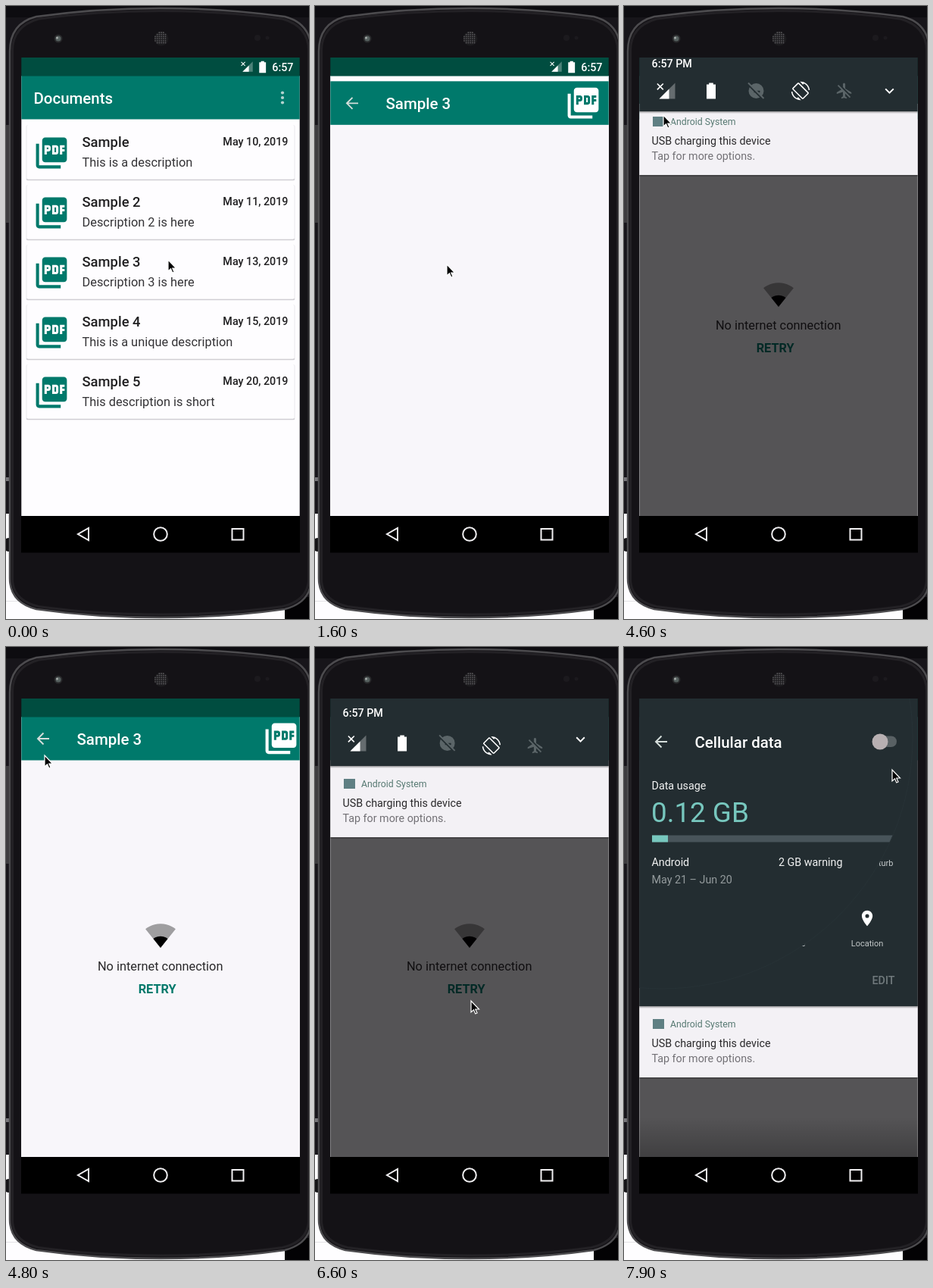
Animation, 400 px wide and 809 px high, one loop 8000 ms. Source, as an HTML page:

```html
<!DOCTYPE html>
<html lang="en">
<head>
<meta charset="utf-8">
<title>Document viewer demo</title>
<style>
html, body { margin: 0; width: 100%; height: 100%; overflow: hidden; background: #17151a; }
svg { display: block; width: 100%; height: 100%; font-family: Roboto, sans-serif; }
</style>
</head>
<body>
<svg id="stage" viewBox="0 0 400 809" xmlns="http://www.w3.org/2000/svg"></svg>
<script>
const LOOP = 8000, STEP = 100;
const TEAL = '#00796b', PANEL = '#232d31', DIM = '#5b6568';

const text = (x, y, s, size, fill, extra = '') =>
  `<text x="${x}" y="${y}" font-size="${size}" fill="${fill}" ${extra}>${s}</text>`;
const MEDIUM = 'font-weight="500"';
const rect = (x, y, w, h, fill, extra = '') =>
  `<rect x="${x}" y="${y}" width="${w}" height="${h}" fill="${fill}" ${extra}/>`;
const group = (id, body, extra = '') => `<g id="${id}" ${extra}>${body}</g>`;

const PDF = 'M20 2H8c-1.1 0-2 .9-2 2v12c0 1.1.9 2 2 2h12c1.1 0 2-.9 2-2V4c0-1.1-.9-2-2-2z' +
  'm-8.5 7.5c0 .83-.67 1.5-1.5 1.5H9v2H7.5V7H10c.83 0 1.5.67 1.5 1.5v1zm5 2c0 .83-.67 1.5-1.5 1.5h-2.5V7H15' +
  'c.83 0 1.5.67 1.5 1.5v3zm4-3H19v1h1.5V11H19v2h-1.5V7h3v1.5zM9 9.5h1v-1H9v1zM4 6H2v14c0 1.1.9 2 2 2h14v-2H4V6z' +
  'm10 5.5h1v-3h-1v3z';
const pdfIcon = (x, y, fill) => `<path d="${PDF}" fill="${fill}" transform="translate(${x} ${y}) scale(2.04)"/>`;
const FAN = 'M12 21.5L23.64 7C23.2 6.66 18.7 3 12 3S.8 6.66.36 7z';

const signal = size => {
  const h = size / 2, k = size * .62;
  return `<path d="M${-h} ${h}H${h}V${-h}z" fill="#fff" opacity=".3"/>
    <path d="M${-h} ${h}h${k}v${-k}z" fill="#fff"/>
    <path d="M${-h * 1.25} ${-h * .9}l${h * .75} ${h * .75}m0 ${-h * .75}l${-h * .75} ${h * .75}" stroke="#fff" stroke-width="${size / 13}"/>`;
};
const battery = s => `<path transform="scale(${s})" fill="#fff" d="M-6-8.5h3.2V-10.5h5.6v2H6V10.5H-6z"/>`;
const icon24 = (d, fill) => `<path transform="translate(-12.2 -12.2) scale(1.02)" fill="${fill}" d="${d}"/>`;
const arrow = y => `<path d="M57 ${y}H41.5m8-7.5l-7.5 7.5l7.5 7.5" fill="none" stroke="#d5dedb" stroke-width="1.9"/>`;

const ROTATE = 'M16.48 2.52c3.27 1.55 5.61 4.72 5.97 8.48h1.5C23.44 4.84 18.29 0 12 0l-.66.03 3.81 3.81 1.33-1.32z' +
  'm-6.25-.77c-.59-.59-1.54-.59-2.12 0L1.75 8.11c-.59.59-.59 1.54 0 2.12l12.02 12.02c.59.59 1.54.59 2.12 0l6.36-6.36' +
  'c.59-.59.59-1.54 0-2.12L10.23 1.75zm4.6 19.44L2.81 9.17l6.36-6.36 12.02 12.02-6.36 6.36zm-7.31.29' +
  'C4.25 19.94 1.91 16.76 1.55 13H.05C.56 19.16 5.71 24 12 24l.66-.03-3.81-3.81-1.33 1.32z';
const PLANE = 'M13 9V3.5c0-.83-.67-1.5-1.5-1.5S10 2.67 10 3.5v3.68l7.83 7.83L21 16v-2l-8-5zM3 5.27l4.99 4.99L2 14v2' +
  'l8-2.5V19l-2 1.5V22l3.5-1 3.5 1v-1.5L13 19v-3.73L18.73 21 20 19.73 4.27 4 3 5.27z';
const PIN = 'M12 2C8.13 2 5 5.13 5 9c0 5.25 7 13 7 13s7-7.75 7-13c0-3.87-3.13-7-7-7zm0 9.5a2.5 2.5 0 110-5 2.5 2.5 0 010 5z';
const DISTURB = `<circle r="10" fill="${DIM}"/><path d="M-3 1h8M-11-9L9 11" stroke="${PANEL}" stroke-width="2.5"/>
  <path d="M-10.5-10.5L10 10" stroke="${DIM}" stroke-width="2"/>`;

// Quick setting: drawing, collapsed x, expanded position, label.
const tiles = [
  [signal(21), 57, 87, 252, 'Android'],
  [battery(1), 115, 204, 252, '100%'],
  [DISTURB, 174.5, 321, 252, 'Do not disturb'],
  [icon24(ROTATE, '#fff'), 233, 87, 358, 'Auto-rotate'],
  [icon24(PLANE, DIM), 291, 204, 358, 'Airplane mode'],
];

const documents = [
  ['Sample', 'This is a description', 10],
  ['Sample 2', 'Description 2 is here', 11],
  ['Sample 3', 'Description 3 is here', 13],
  ['Sample 4', 'This is a unique description', 15],
  ['Sample 5', 'This description is short', 20],
];

function phone() {
  let dots = '';
  for (let y = -8; y <= 8; y += 2.7)
    for (let x = -8; x <= 8; x += 2.7)
      if (x * x + y * y < 75) dots += `<circle cx="${205 + x}" cy="${43 + y}" r=".9"/>`;
  return rect(0, 0, 400, 809, '#17151a') + rect(0, 0, 400, 15, '#0d0c10') +
    rect(0, 670, 368, 139, '#fefdff') + rect(0, 785, 368, 1, '#e4e3e6') + rect(368, 780, 32, 29, '#030204') +
    '<circle cx="4" cy="711" r="9" fill="#151417"/>' +
    rect(0, 157, 5, 129, '#3d3c3f') + rect(0, 622, 5, 5, '#77767a') +
    `<path d="M5 60Q5 23 40 14Q120 3 204 3T368 14Q403 23 403 60V755Q403 787 368 796Q290 807 204 807T40 796Q5 787 5 755z"
      fill="#141216" stroke="#4c4b4e" stroke-width="2.5"/>
    <path d="M8.5 60Q8 27 43 17Q120 6.5 204 6.5T365 17Q400 27 399.5 60V755Q400 784 365 792.5Q290 803 204 803T43 792.5Q8 784 8.5 755z"
      fill="none" stroke="#232125" stroke-width="3"/>
    <circle cx="69" cy="43" r="5.5" fill="#29292b"/><circle cx="69" cy="43" r="3.5" fill="#56605f"/><circle cx="67.5" cy="42" r="1.5" fill="#a5aaa9"/>
    <circle cx="205" cy="43" r="9.5" fill="#1c1b1e"/><g fill="#58575a">${dots}</g>
    <circle cx="332" cy="42" r="4" fill="#1c1a1e"/><circle cx="345" cy="42" r="2.5" fill="#1c1a1e"/>`;
}

function listScreen() {
  const card = ([name, about, day], i) => `<g transform="translate(0 ${i * 79})">
    ${rect(26.5, 157, 355, 73.5, '#e9e8eb', 'rx="2.5"')}${rect(27, 228, 354, 2, '#d0ced3', 'rx="1"')}
    ${rect(27.5, 157, 353, 71.8, '#fefdff', 'rx="2"')}${pdfIcon(35.5, 169.5, TEAL)}
    ${text(100.5, 185.5, name, 18.4, '#212022', MEDIUM)}${text(100.5, 212, about, 16.35, '#343336')}
    ${text(372.5, 184, `May ${day}, 2019`, 14.3, '#212022', MEDIUM + ' text-anchor="end"')}</g>`;
  return rect(20, 92, 368, 581, '#fefdff') + rect(20, 92, 368, 57.5, TEAL) +
    text(36.5, 129, 'Documents', 20.44, '#fff', MEDIUM) +
    [114.5, 121, 127.5].map(y => `<circle cx="365" cy="${y}" r="2.1" fill="#b4d3cf"/>`).join('') +
    documents.map(card).join('');
}

function viewerScreen() {
  const fan = 'transform="translate(183.5 360.2) scale(1.71)"';
  const message = `<path d="${FAN}" ${fan} opacity=".36"/><path id="bars" d="${FAN}"/>` +
    text(203.7, 427, 'No internet connection', 16.35, '#2a292b', 'text-anchor="middle"') +
    text(199.7, 457, 'RETRY', 16.35, TEAL, 'font-weight="700" text-anchor="middle"');
  return rect(20, 92, 368, 581, '#fefdff') + group('slide',
    rect(20, 92, 368, 581, '#f8f6fa') + rect(20, 92, 368, 57.5, TEAL) + arrow(121) +
    text(93.5, 129, 'Sample 3', 20.44, '#fff', MEDIUM) + group('action', pdfIcon(338.5, 96.3, '#fff')) +
    group('message', message));
}

function shade() {
  const notice = rect(20, 150, 368, 94, '#f3f1f5') + rect(20, 244, 368, 2, '#000', 'opacity=".2"') +
    rect(38, 167, 15, 13, '#5f7f83') + text(61, 178, 'Android System', 12.3, '#587a73') +
    text(36.5, 204, 'USB charging this device', 14.3, '#2a292b') +
    text(36.5, 224, 'Tap for more options.', 14.3, '#737176');
  const label = (x, y, s) => text(x, y, s, 11, '#c3c8c9', 'text-anchor="middle"');
  const labels = tiles.map(([, , x, y, s]) => label(x, y + 37, s)).join('') + label(321, 395, 'Location') +
    `<g transform="translate(321 358)">${icon24(PIN, '#fff')}</g>` + text(327.5, 445, 'EDIT', 14.3, '#717a7d', MEDIUM);
  const detail = rect(20, 68, 368, 406, PANEL) + arrow(125) +
    text(93.5, 133, 'Cellular data', 20.44, '#fff', MEDIUM) +
    rect(333, 117.5, 27, 14.5, '#596164', 'rx="7.25"') + '<circle cx="338" cy="125" r="10.5" fill="#b8b0b2"/>' +
    text(36.5, 187.5, 'Data usage', 14.3, '#f2f3f3') + text(36, 231, '0.12 GB', 36.8, '#77c7be') +
    rect(37, 248.5, 334, 9, '#48545a') + rect(37, 248.5, 21, 9, '#77c7be') +
    text(36.5, 289, 'Android', 14.3, '#f2f3f3') + text(204, 289, '2 GB warning', 14.3, '#f2f3f3') +
    text(36.5, 312, 'May 21 – Jun 20', 14.3, '#949b9d');
  return rect(20, 620, 368, 53, 'url(#fade)', 'id="footFade"') + group('notice', notice) + group('header',
    rect(20, 150, 368, 3, 'url(#shadow)', 'id="panelShadow"') +
    rect(20, 0, 368, 150, PANEL, 'id="panel"') + text(36.5, 92.3, '6:57 PM', 14.3, '#fff', MEDIUM) +
    tiles.map(([art], i) => group('tile' + i, art)).join('') +
    group('chevron', '<path d="M-5.3-2.6L0 2.7L5.3-2.6" fill="none" stroke="#fff" stroke-width="2"/>') +
    group('labels', labels) + group('detail', detail, 'clip-path="url(#reveal)"') +
    '<circle id="ring" cx="50" cy="120" fill="none" stroke="#273236" clip-path="url(#panelClip)"/>');
}

const vertical = (id, from, to) => `<linearGradient id="${id}" x2="0" y2="1">
  <stop stop-opacity="${from}"/><stop offset="1" stop-opacity="${to}"/></linearGradient>`;

const stage = document.getElementById('stage');
stage.innerHTML = `<defs>${vertical('shadow', .4, 0)}${vertical('fade', 0, .25)}
    <clipPath id="screen"><rect x="20.3" y="68" width="367.4" height="605"/></clipPath>
    <clipPath id="panelClip"><rect id="panelBox" x="20" y="68" width="368" height="82"/></clipPath>
    <clipPath id="reveal" clip-path="url(#panelClip)"><circle id="hole" cx="50" cy="120"/></clipPath>
  </defs>${phone()}
  <g clip-path="url(#screen)">${group('list', listScreen())}${group('viewer', viewerScreen())}
    ${rect(20, 68, 368, 24.5, '#004d40')}
    ${group('status', `<g transform="translate(319 80)">${signal(13.5)}</g><g transform="translate(338.7 80.5)">${battery(.74)}</g>` +
      text(379.5, 85.5, '6:57', 14.3, '#fff', MEDIUM + ' text-anchor="end"'))}
    ${rect(20, 68, 368, 605, '#020003', 'id="scrim"')}${group('shade', shade())}</g>
  ${rect(20, 673, 368, 48.5, '#000')}
  <g fill="none" stroke="#f1f0f2" stroke-width="2"><path d="M109 689V705L95 697z"/><circle cx="204" cy="697" r="8.8"/>
    <rect x="298.5" y="690" width="15" height="14.5"/></g>
  <path id="cursor" d="M0 0V15L3.5 11.8L5.8 17L8 16L5.8 11H10.5Z" fill="#000" stroke="#fff" stroke-width="1.2"/>`;

const el = {};
stage.querySelectorAll('[id]').forEach(node => el[node.id] = node);
const set = (id, name, value) => el[id].setAttribute(name, value);
const move = (id, x, y) => set(id, 'transform', `translate(${x} ${y})`);
const clamp = v => Math.max(0, Math.min(1, v));
const mix = (a, b, u) => a + (b - a) * u;

function track(keys, t, ease = u => u) {
  const i = keys.findIndex(k => k[0] > t);
  if (i < 0) return keys[keys.length - 1].slice(1);
  if (i === 0) return keys[0].slice(1);
  const a = keys[i - 1], b = keys[i], u = ease((t - a[0]) / (b[0] - a[0]));
  return a.slice(1).map((v, k) => mix(v, b[k + 1], u));
}
const smooth = u => u * u * (3 - 2 * u);

const cursorKeys = [[0, 214, 335], [600, 205, 340], [1200, 174, 341], [1700, 174, 341], [2700, 214, 90], [3200, 217, 76],
  [3400, 218, 158], [3600, 218, 400], [3800, 210, 400], [4400, 52, 144], [4600, 52, 144], [4800, 51, 143],
  [5400, 195, 447], [5800, 198, 447], [6300, 206, 76], [6600, 206, 467], [6700, 206, 467], [7200, 56, 122],
  [7400, 56, 122], [7900, 354, 162]];
const shadeKeys = [[3400, 0], [3600, 1], [4500, 1], [4600, .9], [4800, 0], [6300, 0], [6500, 1]];
const statusKeys = [[3300, 1], [3400, .7], [3500, 0], [4800, 0], [5100, 1], [6300, 1], [6400, 0]];
const expandKeys = [[6500, 0], [6600, .0216], [6800, 0], [7300, 0], [7700, 1]];
const revealKeys = [[7400, 0], [7900, 331], [8000, 400]];
const barScale = [.48, .62, .73, 1];

function render(t) {
  move('cursor', ...track(cursorKeys, t, smooth));

  const entry = clamp((t - 1350) / 350);
  set('viewer', 'opacity', clamp((t - 1350) / 150));
  move('slide', 0, 48 * (1 - entry) ** 1.5);
  move('action', t < 1900 ? -9 : 0, 0);
  set('message', 'visibility', t < 2400 ? 'hidden' : 'visible');
  const bar = barScale[Math.floor(((t + 1600) % 2000) / 500)];
  set('bars', 'transform', `translate(204 397) scale(${1.71 * bar}) translate(-12 -21.5)`);

  const [open] = track(shadeKeys, t);
  const [expand] = track(expandKeys, t);
  const [radius] = track(revealKeys, t);
  const growth = 324 * expand;
  set('status', 'opacity', track(statusKeys, t)[0]);
  set('scrim', 'opacity', .66 * clamp(open / .8));
  set('shade', 'visibility', open ? 'visible' : 'hidden');
  move('header', 0, -110 * (1 - open));
  move('notice', 0, growth - 210 * (1 - open));
  set('panel', 'height', 150 + growth);
  set('panelShadow', 'y', 150 + growth);
  set('panelBox', 'height', 82 + growth);
  set('footFade', 'opacity', expand);
  // Tiles drop first and spread sideways later.
  const drop = clamp(expand * 1.4), spread = drop ** 2;
  tiles.forEach(([, x, toX, toY], i) => move('tile' + i, mix(x, toX, spread), mix(123, toY, drop)));
  move('chevron', 350.5, mix(123, 87, drop));
  set('labels', 'opacity', clamp(expand * 2 - 1));
  set('hole', 'r', radius);
  set('ring', 'r', radius);
}

const start = performance.now();
function frame(now) {
  const t = Math.max(0, now - start) % LOOP;
  render(Math.floor(t / STEP) * STEP);
  requestAnimationFrame(frame);
}
render(0);
requestAnimationFrame(frame);
</script>
</body>
</html>
```
